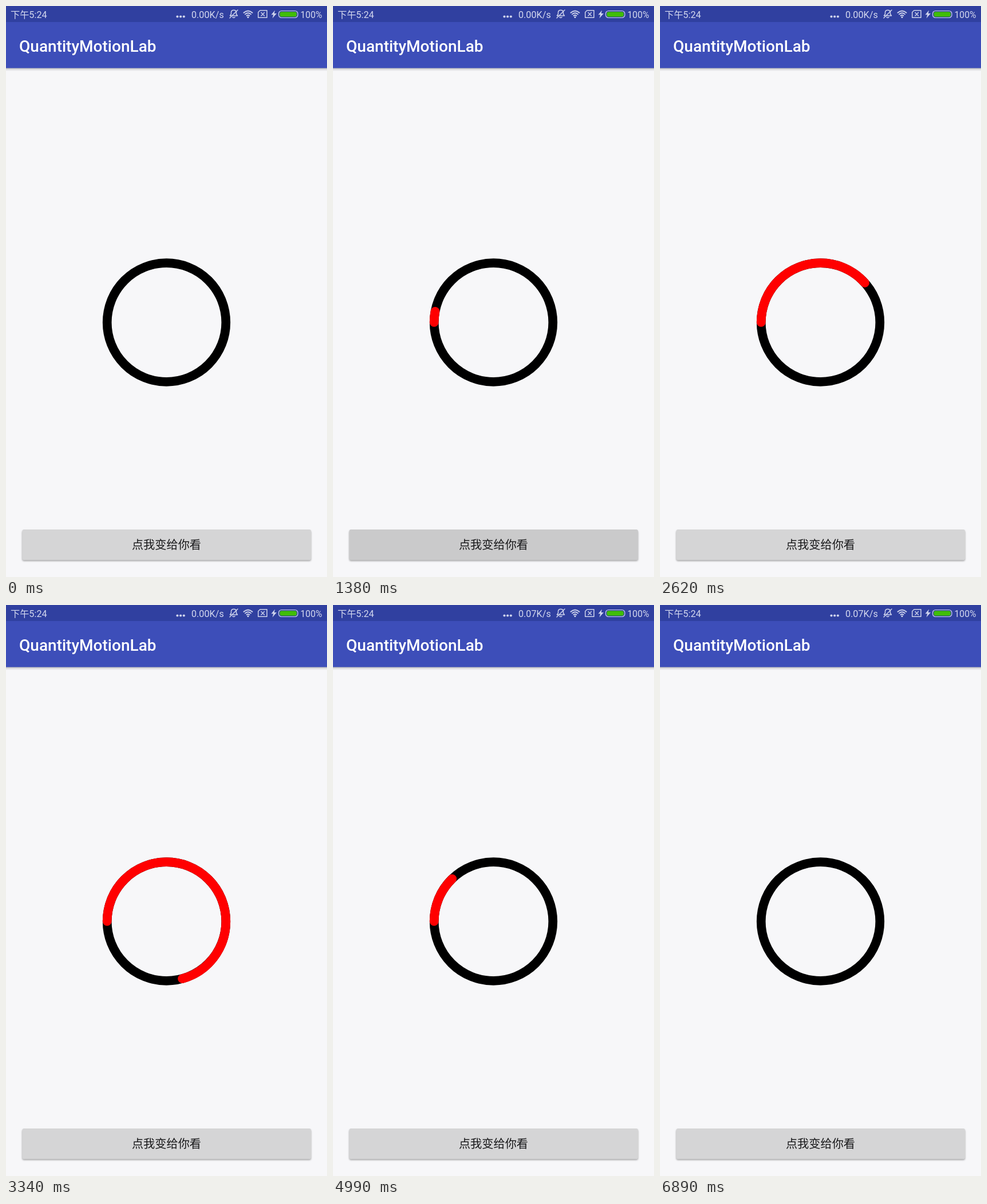
An HTML page for the animation above (6920 ms loop, 561 by 998 pixels).

```html
<!DOCTYPE html>
<html lang="zh-CN">
<head>
<meta charset="utf-8">
<style>
  html, body { margin: 0; width: 100%; height: 100%; overflow: hidden; background: #f7f7f9; }
  svg { display: block; width: 100vw; height: 100vh; }
  text { font-family: Roboto, "Noto Sans CJK SC", "Noto Sans CJK", sans-serif; }
  .status { fill: #d5d9ef; font-size: 16.2px; }
  .icon { fill: none; stroke: #ced3ec; stroke-width: 1.5; stroke-linecap: round; stroke-linejoin: round; }
  .solid { fill: #ced3ec; }
</style>
</head>
<body>
<svg viewBox="0 0 561 998" preserveAspectRatio="none">
  <defs>
    <linearGradient id="barShadow" x1="0" y1="0" x2="0" y2="1">
      <stop offset="0" stop-color="#000" stop-opacity=".3"/>
      <stop offset=".4" stop-color="#000" stop-opacity=".12"/>
      <stop offset="1" stop-color="#000" stop-opacity="0"/>
    </linearGradient>
    <filter id="soft" x="-5%" y="-30%" width="110%" height="160%"><feGaussianBlur stdDeviation="1.7"/></filter>
    <clipPath id="buttonClip"><rect x="28.5" y="915" width="504.5" height="53.5" rx="3"/></clipPath>
  </defs>

  <rect width="561" height="998" fill="#f7f7f9"/>
  <rect y="108" width="561" height="6" fill="url(#barShadow)"/>
  <rect width="561" height="108.5" fill="#3d4eb9"/>
  <rect width="561" height="28" fill="#3040a0"/>

  <text class="status" x="8" y="21" font-size="15.5">下午5:24</text>
  <g class="solid">
    <circle cx="299.5" cy="18.5" r="2.1"/>
    <circle cx="305.2" cy="18.5" r="2.1"/>
    <circle cx="310.9" cy="18.5" r="2.1"/>
    <path d="M470 7.5 463.5 15.2H467.2L465.6 21.5 473 13H468.8Z"/>
    <circle cx="423" cy="19.6" r="1.6"/>
  </g>
  <text class="status" id="speed" x="324" y="21">0.00K/s</text>
  <g class="icon">
    <path d="M391.5 17H404.5L402.5 14.2V11.5C402.5 8.7 400.8 7.2 398 7.2S393.5 8.7 393.5 11.5V14.2ZM396 19.5Q398 21.5 400 19.5M391 21 405 7"/>
    <path stroke-width="1.9" d="M415.5 11.8Q423 5 430.5 11.8M418 14.4Q423 10 428 14.4M420.5 17Q423 15 425.5 17"/>
    <path d="M444 7.8H456V20.2H440.8V11ZM446 11.5 451.5 17M451.5 11.5 446 17"/>
    <rect x="476.5" y="8.5" width="33.5" height="12" rx="5" stroke-width="1.2"/>
  </g>
  <rect x="478.5" y="10.2" width="29.5" height="8.6" rx="3.3" fill="#40bd08"/>
  <text class="status" x="514.5" y="21" style="font-size:15.7px">100%</text>

  <text x="23" y="80" fill="#fff" font-size="28" font-weight="500">QuantityMotionLab</text>

  <g fill="none" stroke-width="15.7">
    <circle cx="280.5" cy="553" r="103.8" stroke="#000"/>
    <circle id="arc" cx="280.5" cy="553" r="103.8" stroke="#f00" stroke-linecap="round"
      pathLength="360" transform="rotate(180 280.5 553)" visibility="hidden"/>
  </g>

  <rect id="shadow" x="28.5" y="917" width="504.5" height="53" rx="3" fill="#000" opacity=".36" filter="url(#soft)"/>
  <rect x="28.5" y="915" width="504.5" height="53.5" rx="3" fill="#d5d5d6"/>
  <g clip-path="url(#buttonClip)">
    <rect id="press" x="28" y="915" width="506" height="54" fill="#000014"/>
    <circle id="ripple" cx="280.5" cy="942" fill="#000014"/>
  </g>
  <text x="280.5" y="949" text-anchor="middle" fill="#18181a" font-size="20.2">点我变给你看</text>
</svg>
<script>
  const LOOP = 6920;
  const SWEEP = { start: 932, length: 5000, peak: 270 };
  const PRESS = 840;
  const SPEED_CHANGE = 4500;

  const byId = id => document.getElementById(id);
  const arc = byId('arc'), speed = byId('speed'), shadow = byId('shadow');
  const press = byId('press'), ripple = byId('ripple');
  const progress = (t, start, length) => Math.min(1, Math.max(0, (t - start) / length));
  const ease = p => (1 - Math.cos(Math.PI * p)) / 2;

  // The easing spans the whole there-and-back sweep.
  function drawArc(t) {
    const p = ease(progress(t, SWEEP.start, SWEEP.length));
    const angle = SWEEP.peak * (1 - Math.abs(2 * p - 1));
    arc.setAttribute('visibility', angle > 0.01 ? 'visible' : 'hidden');
    arc.setAttribute('stroke-dasharray', `${angle} 360`);
  }

  function drawButton(t) {
    const fade = 1 - progress(t, 1080, 480);
    const lift = progress(t, PRESS, 100) * (1 - progress(t, 950, 150));
    press.setAttribute('opacity', 0.05 * progress(t, PRESS, 80) * fade);
    ripple.setAttribute('opacity', t > PRESS ? 0.09 * fade : 0);
    ripple.setAttribute('r', 260 * ease(progress(t, PRESS, 320)));
    shadow.setAttribute('y', 917 + 3 * lift);
  }

  function render(t) {
    drawArc(t);
    drawButton(t);
    speed.textContent = t < SPEED_CHANGE ? '0.00K/s' : '0.07K/s';
  }

  const origin = performance.now();
  function tick() {
    render((performance.now() - origin) % LOOP);
    requestAnimationFrame(tick);
  }
  tick();
</script>
</body>
</html>
```
